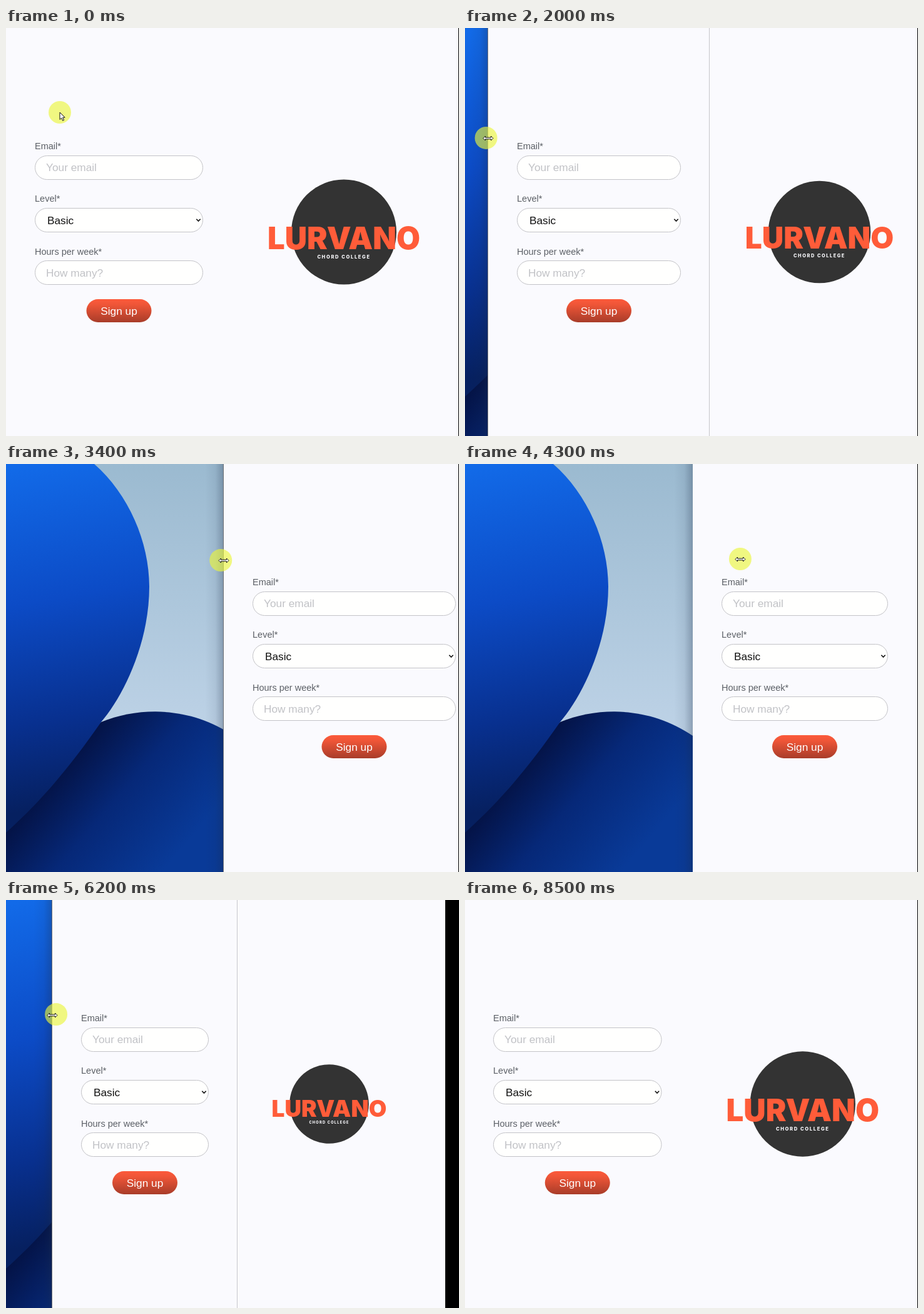
These frames come from a looping animation (724 px wide and 653 px high, 8.9 s). An HTML page:

```html
<!DOCTYPE html>
<html lang="en">
<head>
<meta charset="utf-8">
<title>Responsive sign-up form</title>
<style>
  html, body { margin: 0; width: 100%; height: 100%; overflow: hidden; background: #fafafe; }
  svg { display: block; width: 724px; height: 653px; font-family: "Liberation Sans", Arial, sans-serif; }
  .label { font-size: 14.5px; fill: #5c6066; }
  .field { fill: #fffffe; stroke: #c3c3c7; }
  .hint { font-size: 17.28px; fill: #c1c2c6; }
  .value { font-size: 17.28px; fill: #111; }
  .action { font-size: 17.28px; fill: #fff; text-anchor: middle; }
  .brand { font: 900 49px Inter, sans-serif; fill: #ff5c39; text-anchor: middle; }
  .tagline { font: 800 7.6px Inter, sans-serif; fill: #fafafe; letter-spacing: 1.6px; text-anchor: middle; }
</style>
</head>
<body>
<svg viewBox="0 0 724 653">
  <defs>
    <linearGradient id="sky" x2="0" y2="1">
      <stop stop-color="#9bbad0"/><stop offset=".65" stop-color="#bdd2e6"/>
    </linearGradient>
    <linearGradient id="upper" gradientUnits="userSpaceOnUse" x1="40" y1="0" x2="130" y2="540">
      <stop stop-color="#126ae8"/><stop offset=".4" stop-color="#0c4bc6"/>
      <stop offset=".75" stop-color="#08308f"/><stop offset="1" stop-color="#062060"/>
    </linearGradient>
    <linearGradient id="lower" gradientUnits="userSpaceOnUse" x1="60" y1="470" x2="260" y2="640">
      <stop stop-color="#030c36"/><stop offset=".5" stop-color="#062878"/><stop offset="1" stop-color="#093a98"/>
    </linearGradient>
    <linearGradient id="button" x2="0" y2="1">
      <stop stop-color="#fc5a3b"/><stop offset=".25" stop-color="#ee5537"/><stop offset="1" stop-color="#a83c29"/>
    </linearGradient>
    <linearGradient id="shade">
      <stop stop-color="#1a2a44" stop-opacity="0"/>
      <stop offset=".55" stop-color="#1a2a44" stop-opacity=".07"/>
      <stop offset="1" stop-color="#1a2a44" stop-opacity=".3"/>
    </linearGradient>
  </defs>

  <rect width="724" height="653" fill="url(#sky)"/>
  <path fill="url(#lower)" d="M0 560 L152 413 C215 388 295 388 364 435 L480 520 V653 H0Z"/>
  <path fill="url(#upper)" d="M0 0 H141 C196 48 229 125 229 196 C229 290 185 375 152 413 C95 495 50 545 0 590Z"/>
  <rect id="shadow" width="30" height="653" fill="url(#shade)"/>

  <g id="win">
    <rect width="760" height="653" fill="#fafafe"/>
    <rect id="rim" x="-1" width="1" height="653" fill="#6c6e74"/>
    <rect id="divider" width="1" height="653" fill="#c6c6ca"/>
    <g id="logo">
      <circle r="84" fill="#333"/>
      <text class="brand" y="27">LURVANO</text>
      <text class="tagline" y="42">CHORD COLLEGE</text>
    </g>
    <g transform="translate(46 0)">
      <text class="label" y="194">Email*</text>
      <text class="label" y="278">Level*</text>
      <text class="label" y="363">Hours per week*</text>
      <rect class="field" x=".5" y="204.5" height="38" rx="19"/>
      <rect class="field" x=".5" y="288.5" height="38" rx="19"/>
      <rect class="field" x=".5" y="372.5" height="38" rx="19"/>
      <text class="hint" x="18" y="229">Your email</text>
      <text class="value" x="20" y="314">Basic</text>
      <text class="hint" x="18" y="398">How many?</text>
      <path id="chevron" d="M-3.2 -1.7 L0 1.5 L3.2 -1.7" fill="none" stroke="#111" stroke-width="1.6"/>
      <g id="submit">
        <rect x="-52" y="434" width="104" height="37" rx="18.5" fill="url(#button)"/>
        <text class="action" y="459">Sign up</text>
      </g>
    </g>
  </g>
  <rect id="gap" width="400" height="653" fill="#000"/>

  <circle id="halo" r="18" fill="#ebf63c" opacity=".64"/>
  <path id="arrow" fill="#fff" stroke="#111" d="M0 0 V11.5 L2.7 9 L4.6 13.3 L6.6 12.4 L4.7 8.2 H8.2Z"/>
  <path id="resize" fill="#fff" stroke="#111" d="M-8 0 L-4.5 -3.5 V-1.3 H4.5 V-3.5 L8 0 L4.5 3.5 V1.3 H-4.5 V3.5Z"/>
</svg>
<script>
const LOOP = 8900, STEP = 100, DRAG_START = 1400;
const RIGHT = 723, LIMIT = 364, BREAKPOINT = 500;
const LAYOUT_LAG = 250, PAINT_LAG = 100, HALO_LAG = 28;

// Pointer path: [ms, position]
const pathX = [
  [0, 86], [400, 45], [900, 2], [1200, 1], [1400, 1], [1750, 14], [2000, 37], [2300, 92],
  [2550, 158], [2800, 234], [3100, 296], [3400, 348], [3800, 415], [4300, 440], [4400, 440],
  [4800, 412], [5050, 370], [5250, 320], [5500, 260], [5800, 170], [6100, 95], [6400, 42],
  [6750, 16], [7000, 13], [7500, 3], [8000, -1], [8400, -32], [8900, -32]
];
const pathY = [
  [0, 135], [900, 173], [1400, 174], [2000, 176], [2800, 157], [4300, 152],
  [4400, 152], [5500, 170], [7000, 194], [8400, 196], [8900, 196]
];

const $ = id => document.getElementById(id);
const fields = document.querySelectorAll(".field");
const clamp = (v, lo, hi) => Math.min(hi, Math.max(lo, v));
const move = (id, x, y = 0, scale = 1) =>
  $(id).setAttribute("transform", `translate(${x} ${y}) scale(${scale})`);
const show = (id, on) => $(id).setAttribute("visibility", on ? "visible" : "hidden");
const within = (t, from, to) => t >= from && t < to;

const slope = (a, b) => (b[1] - a[1]) / (b[0] - a[0]);

// Smooth tangent that never overshoots a point
function tangent(path, i) {
  if (i === 0 || i === path.length - 1) return 0;
  const a = slope(path[i - 1], path[i]), b = slope(path[i], path[i + 1]);
  return a * b > 0 ? 2 * a * b / (a + b) : 0;
}

function at(path, time) {
  const t = clamp(time, 0, LOOP);
  let i = 0;
  while (i < path.length - 2 && t > path[i + 1][0]) i++;
  const [t0, v0] = path[i], [t1, v1] = path[i + 1];
  const span = t1 - t0, u = (t - t0) / span, w = 1 - u;
  return v0 * w * w * (1 + 2 * u) + v1 * u * u * (3 - 2 * u)
    + span * u * w * (tangent(path, i) * w - tangent(path, i + 1) * u);
}

const edgeAt = t => t < DRAG_START ? 0 : Math.round(clamp(at(pathX, t), -1, LIMIT));

function draw(t) {
  const edge = edgeAt(t);
  const width = RIGHT - 1 - edgeAt(t - LAYOUT_LAG);
  const twoColumns = width > BREAKPOINT;
  const column = twoColumns ? width / 2 : width;
  const inner = column - 92;
  const dragging = within(t, DRAG_START, 4000) || within(t, 4500, 8000);

  move("win", edge);
  move("shadow", edge - 30);
  show("rim", dragging && edge > 0);
  $("divider").setAttribute("x", Math.floor(column) - 1);
  show("divider", within(t, 1400, 2300) || within(t, 4600, 7400));

  fields.forEach(f => f.setAttribute("width", inner - 1));
  move("chevron", inner - 7.5, 307.5);
  move("submit", inner / 2);
  show("logo", twoColumns);
  move("logo", column * 1.5 - 1.5, 326.5, Math.max(0, column - 97) / 264);
  move("gap", RIGHT - Math.max(0, edgeAt(t - PAINT_LAG) - edge));

  const x = at(pathX, t), y = at(pathY, t), onEdge = t >= 800;
  move("halo", at(pathX, t - HALO_LAG), at(pathY, t - HALO_LAG));
  move("arrow", x, y);
  move("resize", Math.round(x), Math.round(y) + .5);
  show("arrow", !onEdge);
  show("resize", onEdge);
}

const start = performance.now();
function tick() {
  const t = (performance.now() - start) % LOOP;
  draw(Math.floor(t / STEP) * STEP);
  requestAnimationFrame(tick);
}
tick();
</script>
</body>
</html>
```
